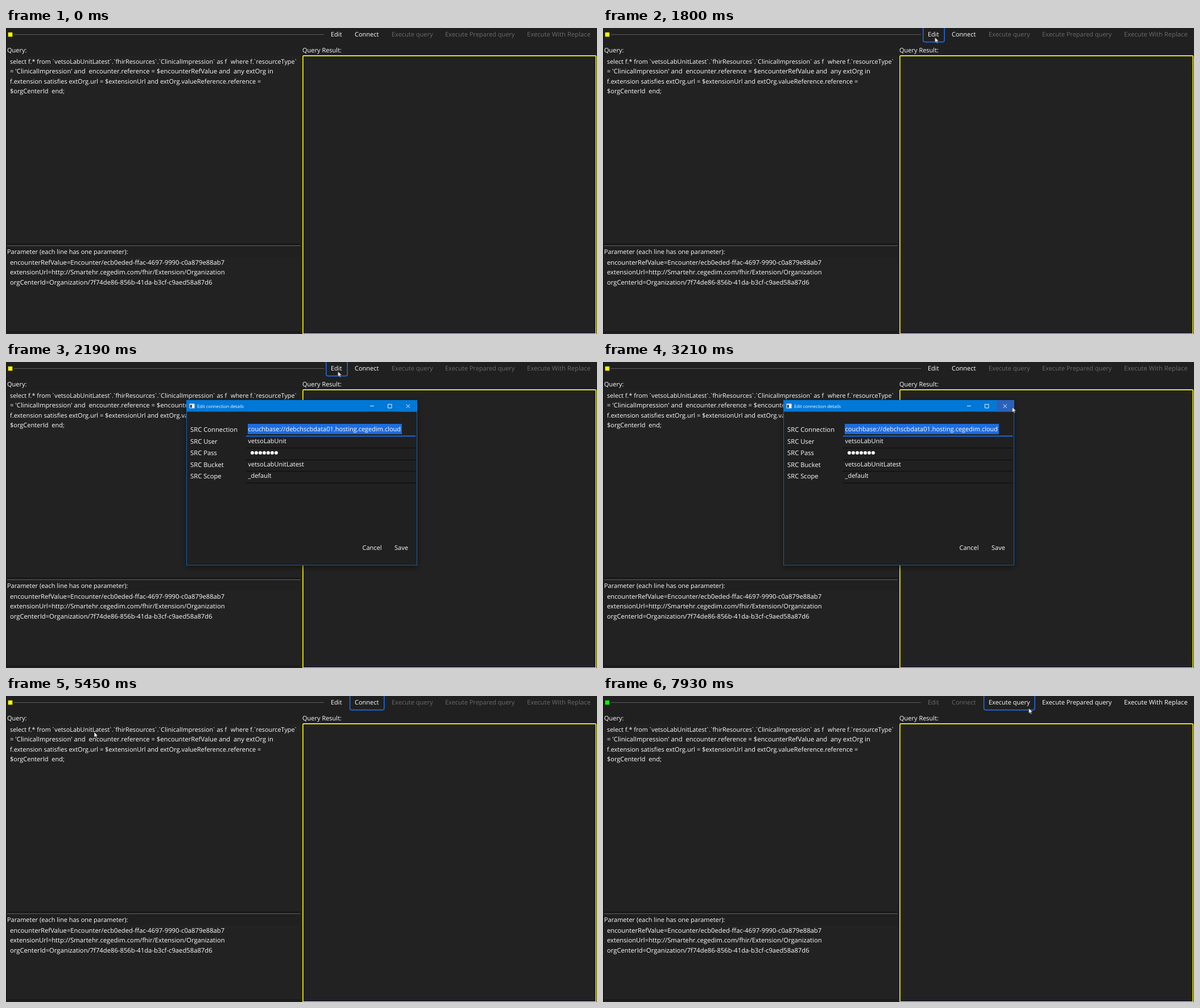
These frames come from a looping animation (1039 by 539 pixels, 8 s). An HTML page:

```html
<!DOCTYPE html>
<html lang="en">
<head>
<meta charset="utf-8">
<title>Query runner</title>
<style>
html, body { margin: 0; width: 100%; height: 100%; overflow: hidden; background: #202020; }
svg { display: block; width: 1039px; height: 539px; }
text { font: 11px "Open Sans", "Noto Sans", sans-serif; fill: #fff; white-space: pre; text-rendering: geometricPrecision; }
.tick { font-family: "Liberation Sans", sans-serif; }
.size1 { font-size: 10.85px; }
.size2 { font-size: 11.25px; }
.title { font-size: 7.8px; }
.tools text { fill: inherit; }
.ring rect { fill: none; stroke: #1f6ade; stroke-width: 1.6; }

/* One 8 s clock; values jump unless a keyframe sets its own steps. */
.tools, .ring rect, #status, #dialog, #closeHover, #cursor, #arrow, #beam, #click {
  animation: 8s step-end -10ms infinite;
}
#early { animation-name: disable; }
#late { animation-name: enable; }
#status { animation-name: status; }
#ringEdit { animation-name: ring-edit; }
#ringConnect { animation-name: ring-connect; }
#ringQuery { animation-name: ring-query; }
#ringPrepared { animation-name: ring-prepared; }
#dialog {
  animation-name: dialog; transform-origin: 520px 213px;
  filter: drop-shadow(0 3px 4px rgba(0, 0, 0, .45));
}
#closeHover { animation-name: close-hover; }
#cursor { animation-name: move; }
#arrow { animation-name: arrow; }
#beam { animation-name: beam; }
#click { animation-name: click; }

@keyframes disable { 0% { fill: #fff } 82.375%, 100% { fill: #6b6b6b } }
@keyframes enable { 0% { fill: #6b6b6b } 82.375%, 100% { fill: #fff } }
@keyframes status { 0% { fill: #ff0 } 78.25%, 100% { fill: #0f0 } }
@keyframes ring-edit {
  0%, 30.125%, 58.125%, 100% { opacity: 0 }
  14.21%, 47.625% { opacity: 1 }
}
@keyframes ring-connect { 0%, 82.375%, 100% { opacity: 0 } 54.125% { opacity: 1 } }
@keyframes ring-query { 0%, 94.35% { opacity: 0 } 93.55%, 98.32%, 100% { opacity: 1 } }
@keyframes ring-prepared { 0%, 96.74%, 100% { opacity: 0 } 94.35% { opacity: 1 } }
@keyframes dialog {
  0%, 48.44%, 100% { opacity: 0; transform: scale(.94) }
  24.875% { opacity: .3; transform: scale(.94); animation-timing-function: steps(3) }
  27.31% { opacity: 1; transform: none }
  47.625% { opacity: .5; transform: scale(.96) }
}
@keyframes close-hover {
  0%, 48.44%, 100% { fill: #0078d7 }
  40.125% { fill: #2a62bb }
  40.875% { fill: #e81123 }
}
@keyframes click {
  0%, 22.5%, 47.625%, 61.5%, 100% { opacity: 0 }
  19.125%, 45.125%, 59% { opacity: 1 }
}
@keyframes arrow {
  0%, 47.625% { opacity: 0 }
  11.53%, 53.31%, 100% { opacity: 1 }
}
@keyframes beam {
  0%, 11.53%, 53.31%, 100% { opacity: 0 }
  3.125%, 47.625% { opacity: 1 }
}
@keyframes move {
  0%, 3.125% { transform: translate(914px, 438px); animation-timing-function: steps(4) }
  6.49% { transform: translate(780px, 260px); animation-timing-function: steps(3) }
  9.01% { transform: translate(620px, 130px); animation-timing-function: steps(2) }
  10.69% { transform: translate(542px, 58px); animation-timing-function: steps(2) }
  12.375% { transform: translate(555px, 20px) }
  13.375% { transform: translate(562px, 19px); animation-timing-function: steps(4) }
  16.75% { transform: translate(582px, 17px) }
  19.125% { transform: translate(583.5px, 16.5px) }
  30.125% { transform: translate(590px, 30px); animation-timing-function: steps(3) }
  32.625% { transform: translate(640px, 150px); animation-timing-function: steps(3) }
  35.125% { transform: translate(690px, 278px); animation-timing-function: steps(2) }
  36.79% { transform: translate(740px, 230px); animation-timing-function: steps(2) }
  38.46% { transform: translate(755px, 140px); animation-timing-function: steps(2) }
  40.125% { transform: translate(719.5px, 79.5px) }
  40.875% { transform: translate(716px, 80px); animation-timing-function: steps(3) }
  44.25%, 50.06% { transform: translate(711.5px, 78.5px); animation-timing-function: steps(4) }
  53.31% { transform: translate(680px, 40px); animation-timing-function: steps(3) }
  55.75% { transform: translate(640px, 14px) }
  58.125% { transform: translate(642.5px, 13.5px) }
  64.75% { transform: translate(600px, 20px); animation-timing-function: steps(4) }
  68.125% { transform: translate(155px, 63.5px); animation-timing-function: steps(2) }
  69.8% { transform: translate(70px, 86px); animation-timing-function: steps(5) }
  74% { transform: translate(7px, 11px) }
  74.875% { transform: translate(5px, 9px) }
  82.375% { transform: translate(20px, 12px); animation-timing-function: steps(6) }
  87.55% { transform: translate(300px, 14px); animation-timing-function: steps(5) }
  91.875% { transform: translate(620px, 12px) }
  92.75% { transform: translate(650px, 14px); animation-timing-function: steps(3) }
  95.14% { transform: translate(800px, 23px); animation-timing-function: steps(2) }
  96.74% { transform: translate(790px, 27px); animation-timing-function: steps(3) }
  99.125%, 100% { transform: translate(748.5px, 21.5px) }
}
</style>
</head>
<body>
<svg viewBox="0 0 1039 539">
  <!-- Main window -->
  <rect width="1039" height="539" fill="#202020"/>
  <path d="M2 49H518V379H2ZM2 403H518V534H2ZM523 50H1036V537H523Z" fill="#222"/>
  <path d="M.5 0V539M2 380.5H518M2 535.5H518" stroke="#111"/>
  <path d="M14 11.5H559M2 383.5H518" stroke="#5c5c5c"/>
  <rect x="522" y="48.9" width="515.2" height="490" rx="1.5" fill="none" stroke="#ff0" stroke-width="1.6"/>
  <rect id="status" x="3.8" y="7.8" width="7.5" height="7.5" fill="#ff0"/>

  <g class="ring">
    <rect id="ringEdit" x="562.8" y="-3" width="37.4" height="27.6" rx="3"/>
    <rect id="ringConnect" x="604.6" y="-3" width="60.2" height="27.6" rx="3"/>
    <rect id="ringQuery" x="669.6" y="-3" width="89.6" height="27.6" rx="3"/>
    <rect id="ringPrepared" x="763.6" y="-3" width="139.6" height="27.6" rx="3"/>
  </g>
  <g id="early" class="tools">
    <text x="571" y="15">Edit</text>
    <text x="613" y="15">Connect</text>
  </g>
  <g id="late" class="tools">
    <text x="678" y="15">Execute query</text>
    <text x="772" y="15">Execute Prepared query</text>
    <text x="916" y="15" class="size2">Execute With Replace</text>
  </g>

  <text x="2" y="43">Query:</text>
  <text x="521" y="43">Query Result:</text>
  <text x="7" y="62.5" class="size1">select f.* from <tspan class="tick">`</tspan>vetsoLabUnitLatest<tspan class="tick">`.`</tspan>fhirResources<tspan class="tick">`.`</tspan>ClinicalImpression<tspan class="tick">`</tspan> as f<tspan x="395">where f.</tspan><tspan class="tick">`</tspan>resourceType<tspan class="tick">`</tspan></text>
  <text x="7" y="80" class="size2">= 'ClinicalImpression' and  encounter.reference = $encounterRefValue and  any extOrg in</text>
  <text x="7" y="97.5">f.extension satisfies extOrg.url = $extensionUrl and extOrg.valueReference.reference =</text>
  <text x="7" y="115">$orgCenterId  end;</text>

  <text x="2" y="397.5">Parameter (each line has one parameter):</text>
  <text x="7" y="416.5" class="size2">encounterRefValue=Encounter/ecb0eded-ffac-4697-9990-c0a879e88ab7</text>
  <text x="7" y="434" class="size2">extensionUrl=http://Smartehr.cegedim.com/fhir/Extension/Organization</text>
  <text x="7" y="452" class="size2">orgCenterId=Organization/7f74de86-856b-41da-b3cf-c9aed58a87d6</text>

  <!-- Connection dialog -->
  <g id="dialog" opacity="0">
    <rect x="317.5" y="67.5" width="405" height="290.5" fill="#202020" stroke="#0f63ad"/>
    <rect x="317" y="67" width="406" height="20.5" fill="#0078d7"/>
    <rect id="closeHover" x="692" y="67" width="31" height="20.5" fill="#0078d7"/>
    <rect x="322.5" y="73.5" width="9" height="8" fill="#f4f4f4"/>
    <rect x="323.5" y="75.5" width="3.5" height="5" fill="#345"/>
    <text x="336" y="81" class="title">Edit connection details</text>
    <path d="M640 77.5H647M671.5 74.5H678V81H671.5ZM703.5 74.5L710 81M710 74.5L703.5 81" fill="none" stroke="#fff" stroke-width=".9"/>

    <text x="324" y="123" class="size2">SRC Connection</text>
    <text x="324" y="143.5" class="size2">SRC User</text>
    <text x="324" y="164" class="size2">SRC Pass</text>
    <text x="324" y="184.5" class="size2">SRC Bucket</text>
    <text x="324" y="205" class="size2">SRC Scope</text>

    <path d="M422 151.5H720M422 172.5H720M422 192.5H720M422 213H720" stroke="#111" stroke-width="1.5"/>
    <path d="M422 130.5H720" stroke="#1a69d4" stroke-width="1.8"/>
    <rect x="425" y="109" width="271" height="18" fill="#1d6ce0"/>
    <text x="425.5" y="122">couchbase://debchscbdata01.hosting.cegedim.cloud</text>
    <text x="425.5" y="142.5">vetsoLabUnit</text>
    <path d="M433 160H476" stroke="#fff" stroke-width="6" stroke-linecap="round" stroke-dasharray="0 7"/>
    <text x="425.5" y="183.5">vetsoLabUnitLatest</text>
    <text x="425.5" y="204">_default</text>
    <text x="626.5" y="331">Cancel</text>
    <text x="683" y="331">Save</text>
  </g>

  <!-- Pointer -->
  <g id="cursor">
    <circle id="click" r="8.5" fill="#ff0" fill-opacity=".47" opacity="0"/>
    <path id="arrow" d="M0 0V9.4L2.2 7.3 3.7 10.6 5.2 9.9 3.7 6.8H6.8Z" fill="#fff" stroke="#111" stroke-width=".6" opacity="0"/>
    <path id="beam" d="M-2.5 -4.5H2.5M0 -4.5V4.5M-2.5 4.5H2.5" stroke="#ddd" stroke-width="1" opacity="0"/>
  </g>
</svg>
</body>
</html>
```
